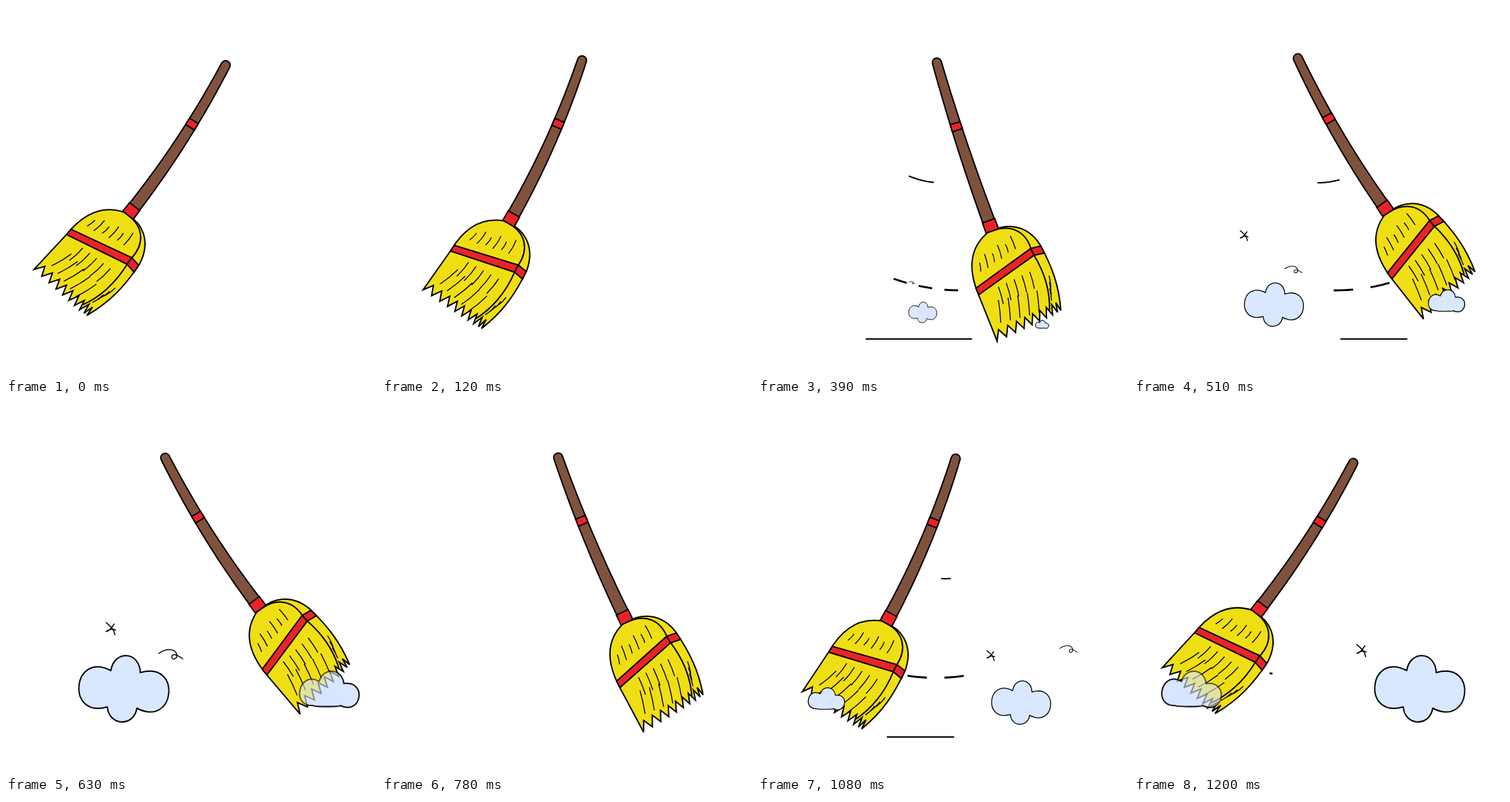
An HTML page with a canvas for the animation above (1.23 s loop, 540 by 540 pixels).

```html
<!DOCTYPE html>
<html lang="en">
<head>
<meta charset="utf-8">
<title>Sweeping broom</title>
<style>
html, body { margin: 0; width: 100%; height: 100%; overflow: hidden; background: #fff; }
canvas { display: block; width: 540px; height: 540px; }
</style>
</head>
<body>
<canvas id="stage" width="540" height="540"></canvas>
<script>
const ctx = document.getElementById('stage').getContext('2d');
const SIZE = 540, LOOP = 1230, STEP = 30;
const YELLOW = '#f0de14', BROWN = '#80523e', RED = '#ea2327', DUST = '#d9e7ff';

const { sin, cos, min, max, PI } = Math;
const clamp = v => min(1, max(0, v));
const smooth = v => { v = clamp(v); return v * v * (3 - 2 * v); };
const range = (n, make) => Array.from({ length: n }, (_, i) => make(i));

// Segments: [x, y] is a line, six numbers are a cubic curve
function trace(segments, map = (x, y) => [x, y]) {
  ctx.beginPath();
  segments.forEach((seg, n) => {
    const out = [];
    for (let i = 0; i < seg.length; i += 2) out.push(...map(seg[i], seg[i + 1]));
    if (!n) ctx.moveTo(...out);
    else if (out.length === 2) ctx.lineTo(...out);
    else ctx.bezierCurveTo(...out);
  });
}

// Swing runs from 0 (left) to 1 (right); the whole broom bends as it tilts.
// Local origin is the collar, y points along the axis to the bristles.
function broomPose(swing) {
  const c = cos(PI * swing), s = sin(PI * swing), squash = .045 * s ** 4;
  const x0 = 275 - 92 * c - 17 * s ** 4;
  const y0 = 296 + 3 * c + 45 * max(0, s) ** 1.3;
  const angle = 37.8 - 73.1 * swing + 2.8 * s * sin(2 * PI * (swing - .1));
  const bend = .041 * c + .018 * s;
  const lean = .3 - 2.3 * swing + 1.5 * s * s;
  return (x, y) => {
    x *= 1 + squash;
    y *= 1 - squash;
    const base = angle + (y < 0 ? lean : 0);
    const mid = (base + bend * y / 2) * PI / 180, end = (base + bend * y) * PI / 180;
    return [x0 - y * sin(mid) + x * cos(end), y0 + y * cos(mid) + x * sin(end)];
  };
}

// Ragged hem from right to left, wider teeth towards the left
function hem(teeth) {
  const tip = i => {
    const f = i / (teeth - 1);
    return [51 - 102 * f ** 1.35, 155 + 5.6 * f];
  };
  return range(teeth - 1, i => {
    const [x, y] = tip(i + 1), [px, py] = tip(i);
    return [[x + (px - x) * .55, py - 14], [x, y]];
  }).flat();
}

const HEAD = [
  [2, 8], [20, 5, 50, 14, 58, 52], [63, 90, 62, 120, 51, 155],
  ...hem(10), [-51, 88], [-52, 50, -40, 20, -7, 8]
];

const stroke = (x, y, dx, dy) => [[x, y], [x + dx / 2 + 1, y + dy / 2, x + dx / 2 + 1, y + dy / 2, x + dx, y + dy]];
const BRISTLES = [
  ...range(6, i => stroke(-33 + 11 * i, 45 - 3 * i - 6 * (i % 2), -3 + .7 * i, 13 + 8 * (i % 2))),
  ...range(5, i => stroke(-20 + 12.5 * i, 88 - i, -2.5, 26)),
  ...range(5, i => stroke(-27 + 14.2 * i, 106 + 2 * i, -9, 32)),
  ...range(3, i => stroke(54 - 3 * i, 100 + 9 * i, -4, 18))
];

function drawBroom(swing) {
  const map = broomPose(swing);
  const halfWidth = y => 9 + .0095 * y;
  const paint = (segments, fill) => {
    trace(segments, map);
    if (fill) { ctx.closePath(); ctx.fillStyle = fill; ctx.fill(); }
    ctx.stroke();
  };
  const sleeve = (top, bottom, grow) => {
    const a = halfWidth(top) + grow, b = halfWidth(bottom) + grow;
    paint([[-a, top], [a, top], [b, bottom], [-b, bottom]], RED);
  };

  ctx.lineWidth = 2;
  const side = range(21, i => -7 - 12.3 * i);
  paint([
    ...side.map(y => [-halfWidth(y), y]),
    [-6.5, -262, 6.5, -262, 6.5, -253],
    ...side.reverse().map(y => [halfWidth(y), y])
  ], BROWN);
  sleeve(-160, -149, 0);
  paint(HEAD, YELLOW);
  paint([[2, 8], [28, 8, 45, 25, 43.5, 52]]);
  paint([[44.3, 63], [50, 95, 46, 125, 36, 148]]);
  sleeve(-8, 8, .5);
  paint([[-51, 78], [43.5, 52], [44.3, 63.4], [-50.8, 88.5]], RED);
  paint([[43.5, 52], [58.2, 54], [59.6, 65.7], [44.3, 63.4]], RED);
  ctx.lineWidth = 1.4;
  BRISTLES.forEach(line => paint(line));
}

// Cloud outline from its notches: [x, y, bulge of the next lobe, flare of the next lobe]
function cloud(notches) {
  return [notches[0].slice(0, 2), ...notches.map(([x, y, bulge, flare], i) => {
    const [ex, ey] = notches[(i + 1) % notches.length];
    const len = Math.hypot(ex - x, ey - y), tx = (ex - x) / len, ty = (ey - y) / len;
    return [x + ty * bulge - tx * flare, y - tx * bulge - ty * flare,
            ex + ty * bulge + tx * flare, ey - tx * bulge + ty * flare, ex, ey];
  })];
}
const BIG = cloud([[-18, -24, 31, -3], [25, -21, 59, 24], [20, 31, 28, -3], [-23, 29, 59, 24]]);
const SMALL = cloud([[-15, -11, 22, -4], [21, -8, 33, 10], [16, 24, 2, 0], [-24, 24, 32, 10]]);
const LOOPLET = [[-17, -1], [-8, -8, 6, -9, 9, 0], [11, 7, 2, 10, 2, 4], [2, -1, 9, 0, 18, 7]];
const CROSS = [
  [[-7, -9], [0, -3, 5, 1, 6, 9]],
  [[5, -7], [0, 0, -3, 4, -7, 4], [0, 0, 3, 0, 7, 2]]
];

// Both sweeps share their rules; the second is mirrored and a little ahead in place
const SWEEPS = [
  { start: 0, mirror: false, begin: 225, shift: 0, looplet: [240, 365], looplets: 690, cross: [153, 328] },
  { start: 570, mirror: true, begin: 300, shift: 46, looplet: [445, 338], looplets: 600, cross: [332, 360] }
];
const place = (sweep, x) => sweep.mirror ? 587 - x : x;

function drawTrails(sweep, t) {
  const { begin, shift } = sweep, age = t - begin;
  if (age <= 0 || t > 630) return;
  // Part of a parabola between two x positions
  const streak = (from, to, apexX, apexY, curl) => {
    if (to <= from) return;
    trace(range(25, i => {
      const x = from + (to - from) * i / 24;
      return [place(sweep, x), apexY - curl * (x - apexX) ** 2];
    }));
    ctx.stroke();
  };
  const chase = (left, right, speed, ...shape) => {
    const tail = left + (right - left) * clamp(age / (570 - begin)) ** 1.9;
    streak(tail, min(right, left + speed * age), ...shape);
  };

  ctx.lineCap = 'butt';
  ctx.lineWidth = 2;
  chase(78 + shift * 1.35, 399, 1.42, 0, 486, 0);
  chase(194 + shift, 300 + shift, .38, 268 + shift, 258 - shift / 15, .0043);

  const dash = 9.5 + .07 * (t - 240), left = 85 + shift;
  const tail = left + (385 - left) * clamp((age - 20) / (610 - begin));
  ctx.lineWidth = 2.8;
  ctx.setLineDash([dash, dash * .9]);
  streak(tail, min(389, tail + 80 + .15 * (t - 240)), 295 + shift * .7, 415 - shift / 3, .0018);
  ctx.setLineDash([]);
}

function doodle(segments, x, y, scale, width, fill) {
  if (scale <= 0) return;
  trace(segments, (px, py) => [x + px * scale, y + py * scale]);
  ctx.lineWidth = width;
  if (fill) { ctx.fillStyle = fill; ctx.fill(); }
  ctx.stroke();
}

function drawSmallDust(sweep, t) {
  const g = clamp((t - 322) / 308);
  const x = 385 + 87 * sin(g * PI / 2) + sweep.shift * .67;
  doodle(SMALL, place(sweep, x), 416 + 76 * (1 - g) ** 1.8, g, max(.9, 2 * g), DUST);
}

function drawBigDust(sweep, t) {
  const g = clamp((t - 281) / 349);
  doodle(BIG, place(sweep, 285 - 114 * g ** .8), 450 - 37 * g * g, g, max(.9, 2 * g), DUST);
}

function drawScribbles(sweep, t) {
  const dir = sweep.mirror ? -1 : 1;
  if (t > 320 && t < sweep.looplets) {
    const g = clamp((t - 320) / 310), size = .15 + .85 * smooth(g), [x, y] = sweep.looplet;
    doodle(LOOPLET, x - 20 * dir * (1 - g), y + 50 * (1 - g), size, max(.8, 1.5 * size));
  }
  const g = clamp((t - 430) / 200), [x, y] = sweep.cross;
  for (const line of CROSS) doodle(line, x + 13 * (1 - g), y + 12 * (1 - g), min(1, 2 * g), 1.5);
}

function draw(time) {
  const local = SWEEPS.map(sweep => [sweep, time - sweep.start]);
  const dusty = local.filter(([, t]) => t >= 270 && t < 690);
  const fade = t => clamp((690 - t) / 60);
  ctx.fillStyle = '#fff';
  ctx.fillRect(0, 0, SIZE, SIZE);
  ctx.strokeStyle = '#000';
  ctx.lineJoin = 'miter';
  ctx.miterLimit = 4;

  for (const [sweep, t] of local) drawTrails(sweep, t);
  for (const [sweep, t] of dusty) {
    ctx.globalAlpha = fade(t);
    drawSmallDust(sweep, t);
  }
  ctx.globalAlpha = 1;
  drawBroom(time < 630 ? smooth(time / 570) : 1 - smooth((time - 630) / 585));

  // The small cloud thins out in front of the bristles
  ctx.lineJoin = ctx.lineCap = 'round';
  for (const [sweep, t] of dusty) {
    ctx.globalAlpha = fade(t) * (1 - .4 * clamp((t - 540) / 90));
    drawSmallDust(sweep, t);
    ctx.globalAlpha = fade(t);
    drawBigDust(sweep, t);
    drawScribbles(sweep, t);
  }
  ctx.globalAlpha = 1;
}

const begin = performance.now();
function tick() {
  const t = (performance.now() - begin) % LOOP;
  draw(Math.floor(t / STEP) * STEP);
  requestAnimationFrame(tick);
}
draw(0);
requestAnimationFrame(tick);
</script>
</body>
</html>
```
